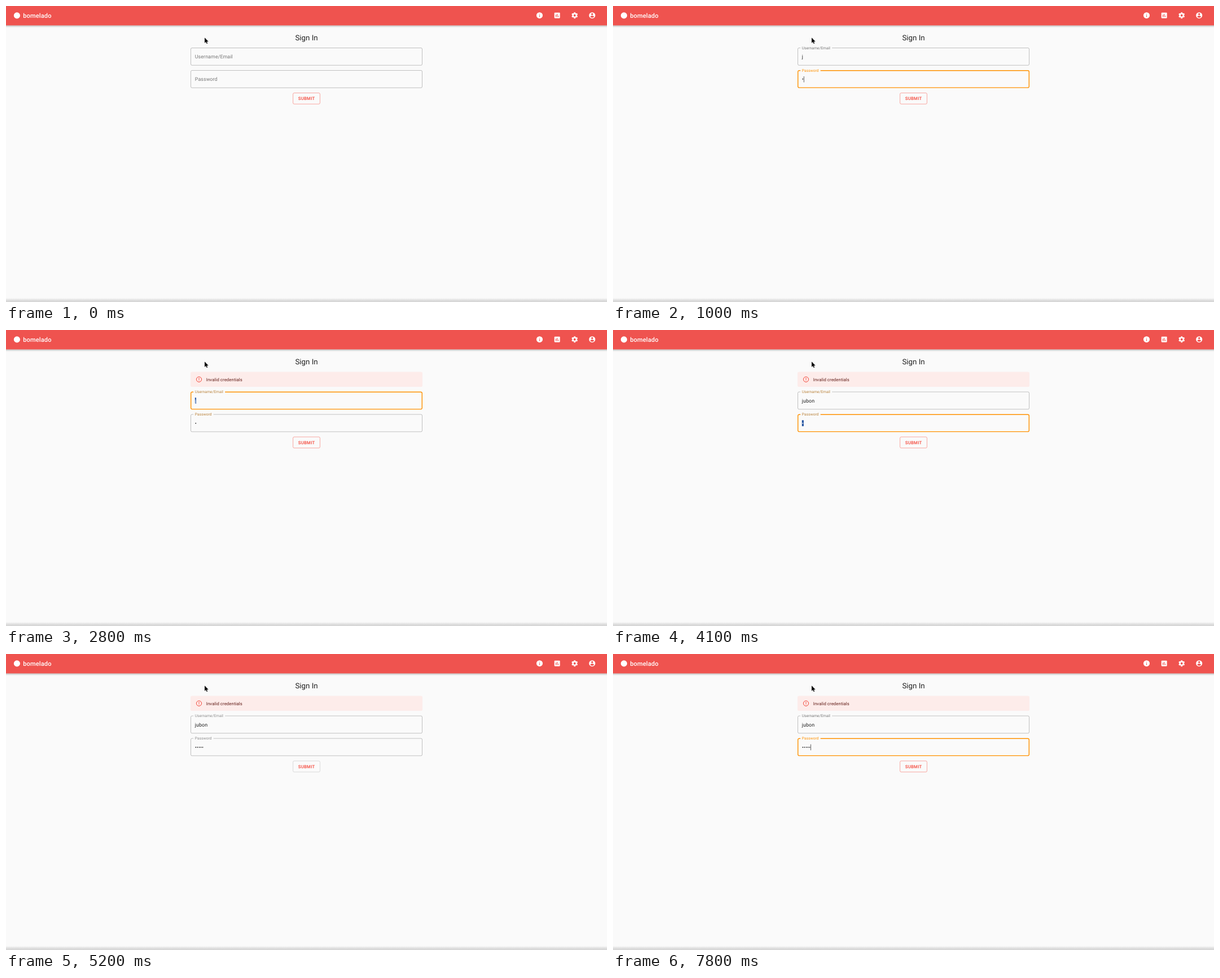
Write an HTML page that moves like this. It is 1065 px wide and 526 px high and loops after 8000 ms.

```html
<!DOCTYPE html>
<html lang="en">
<head>
<meta charset="utf-8">
<title>Sign In</title>
<style>
html, body { margin: 0; width: 100%; height: 100%; overflow: hidden; background: #fafafa; }
svg { display: block; width: 1065px; height: 526px; font-family: Roboto, Arial, sans-serif; }
text { white-space: pre; text-rendering: geometricPrecision; }
</style>
</head>
<body>
<svg id="stage" viewBox="0 0 1065 526" xmlns="http://www.w3.org/2000/svg">
  <defs>
    <linearGradient id="foot" x1="0" y1="0" x2="0" y2="1">
      <stop offset="0" stop-color="#fafafa"/>
      <stop offset=".55" stop-color="#dedede"/>
      <stop offset="1" stop-color="#d4d4d4"/>
    </linearGradient>
    <filter id="shade" x="-5%" y="-50%" width="110%" height="200%">
      <feDropShadow dx="0" dy="1.1" stdDeviation=".9" flood-opacity=".2"/>
      <feDropShadow dx="0" dy="1.6" stdDeviation="1.6" flood-opacity=".15"/>
    </filter>
    <clipPath id="btnClip"><rect x="509" y="154.5" width="47" height="19.7" rx="2.2"/></clipPath>
  </defs>
  <rect width="1065" height="526" fill="#fafafa"/>
  <rect y="519" width="1065" height="7" fill="url(#foot)"/>
  <rect x="-10" y="-10" width="1085" height="44.4" fill="#ef5350" filter="url(#shade)"/>
  <circle cx="19.4" cy="16.9" r="5.6" fill="#fff"/>
  <text x="30.3" y="20.5" font-size="11.1" font-weight="500" letter-spacing=".08" fill="#fff">bomelado</text>
  <g id="icons" fill="#fff"></g>
  <text x="532.5" y="61.2" font-size="13.3" text-anchor="middle" fill="#212121">Sign In</text>
  <g id="form"></g>
  <path d="M352 56.2v9.6l2.2-2 1.5 3.3 1.5-.7-1.5-3.2h3z" fill="#000" stroke="#fff" stroke-width=".8" paint-order="stroke"/>
</svg>
<script>
const LOOP = 8000, STEP = 100;
const NAME = 'jubon';
const LEFT = 327.4, RIGHT = 737.6, TEXT_X = 334.8, SIZE = 8.875, SPACING = 0.083;
const ORANGE = '#ff9100', RED = '#f44336', BAR = '#ef5350';
const TONES = { gray: '#777', dim: '#9f9f9f', soft: '#8c8c8c', mix: '#b9823a', orange: ORANGE };

const form = document.getElementById('form');
const pen = document.createElement('canvas').getContext('2d');
pen.font = SIZE * 10 + 'px Roboto, Arial, sans-serif';
const widthOf = s => pen.measureText(s).width / 10 + s.length * SPACING;

// Each entry changes only the listed parts of the state.
const script = [
  [0, { user: 0, pass: 0, userUp: 0, passUp: 0, userTone: 'gray', passTone: 'gray',
        focus: '', selected: false, alert: false, off: false, edge: 'rgba(244,67,54,.5)', ripple: null }],
  [400, { focus: 'user', userUp: 0.25, userTone: 'mix' }],
  [500, { userUp: 0.85, userTone: 'orange' }],
  [600, { userUp: 1 }],
  [700, { user: 1 }],
  [800, { focus: 'pass', passUp: 0.25, userTone: 'mix', passTone: 'mix' }],
  [900, { passUp: 0.85, passTone: 'orange' }],
  [1000, { passUp: 1, pass: 1, userTone: 'gray' }],
  [1200, { focus: '', off: true, userTone: 'soft', passTone: 'mix', edge: 'rgba(0,0,0,.2)' }],
  [1300, { userTone: 'dim', passTone: 'dim', edge: 'rgba(0,0,0,.12)' }],
  [1400, { alert: true, off: false, userTone: 'soft', passTone: 'soft', edge: 'rgba(0,0,0,.14)' }],
  [1500, { edge: 'rgba(180,50,40,.3)' }],
  [1600, { userTone: 'gray', passTone: 'gray', edge: 'rgba(244,67,54,.5)' }],
  [2000, { ripple: 1950 }],
  [2800, { ripple: null, focus: 'user', selected: true, userTone: 'mix', passTone: 'mix' }],
  [3000, { userTone: 'orange', passTone: 'gray' }],
  [3500, { selected: false, user: 1 }],
  [3600, { user: 2 }],
  [3700, { user: 4 }],
  [4000, { user: 5 }],
  [4100, { focus: 'pass', selected: true, userTone: 'mix', passTone: 'mix' }],
  [4300, { userTone: 'gray', passTone: 'orange' }],
  [4500, { selected: false, pass: 2 }],
  [4600, { pass: 3 }],
  [4800, { pass: 5 }],
  [5000, { focus: '', off: true, userTone: 'dim', passTone: 'dim', edge: 'rgba(0,0,0,.12)' }],
  [5200, { off: false, userTone: 'soft', passTone: 'soft', edge: 'rgba(0,0,0,.14)' }],
  [5400, { userTone: 'gray', passTone: 'gray', edge: 'rgba(244,67,54,.5)' }],
  [5900, { ripple: 5700 }],
  [6800, { ripple: null, focus: 'pass', selected: true, passTone: 'mix' }],
  [7200, { passTone: 'orange' }],
  [7500, { selected: false, pass: 2 }],
  [7700, { pass: 4 }],
  [7800, { pass: 5 }]
];

function stateAt(t) {
  return Object.assign({}, ...script.filter(([at]) => at <= t).map(([, change]) => change));
}

function label(text, x, y, size, color, extra = '') {
  return `<text x="${x}" y="${y}" font-size="${size}" fill="${color}" ${extra}>${text}</text>`;
}

function outline(top, gapEnd, focused) {
  const inset = focused ? 0.3 : 0.1, r = 2.2;
  const l = LEFT + inset, rt = RIGHT - inset, y = top + inset, b = top + 31 - inset;
  const corner = (dx, dy) => `a${r} ${r} 0 0 1 ${dx} ${dy}`;
  const d = `M${gapEnd} ${y}H${rt - r}${corner(r, r)}V${b - r}${corner(-r, r)}` +
    `H${l + r}${corner(-r, -r)}V${y + r}${corner(r, -r)}H332.2`;
  const paint = focused ? `stroke="${ORANGE}" stroke-width="1.4"` : 'stroke="#000" stroke-opacity=".26" stroke-width=".9"';
  return `<path d="${d}" fill="none" ${paint}/>`;
}

function field(s, key, top, title, value) {
  const up = s[key + 'Up'], focused = s.focus === key;
  const gapEnd = up > 0 ? 337.8 + widthOf(title) * 0.75 : 332.2;
  const scale = 1 - 0.25 * up, base = top + 18.7 - 16.3 * up;
  const end = TEXT_X + widthOf(value), marked = focused && s.selected;
  let out = outline(top, gapEnd, focused);
  out += label(title, TEXT_X, base, SIZE * scale, TONES[s[key + 'Tone']], `letter-spacing="${SPACING * scale}"`);
  if (marked) out += `<rect x="${TEXT_X}" y="${top + 10.4}" width="${end - TEXT_X}" height="10.6" fill="#20509e"/>`;
  const ink = marked ? '#fff' : s.off ? '#9f9f9f' : '#212121';
  out += label(value, TEXT_X, top + 18.7, SIZE, ink, `letter-spacing="${SPACING}"`);
  if (focused && !marked) out += `<rect x="${end}" y="${top + 10.6}" width=".7" height="10.6" fill="#222"/>`;
  return out;
}

function ripple(t, start) {
  const age = t - start;
  const grow = Math.min(1, age / 200);
  const pulse = age < 200 ? 0 : (1 - Math.cos(2 * Math.PI * (age - 200) / 2500)) / 2;
  const r = 20.2 * grow * (1 - 0.08 * pulse);
  return `<g clip-path="url(#btnClip)"><circle cx="532.5" cy="164.3" r="${r}" fill="${RED}" opacity="${0.1 + 0.2 * grow}"/></g>`;
}

function button(s, t) {
  return (s.ripple === null ? '' : ripple(t, s.ripple)) +
    `<rect x="508.6" y="154.5" width="47.8" height="19.7" rx="2.2" fill="none" stroke="${s.edge}" stroke-width=".9"/>` +
    label('SUBMIT', 532.6, 167.1, 7.77, s.off ? '#b9b9b9' : RED, 'font-weight="500" letter-spacing=".22" text-anchor="middle"');
}

function alertBox() {
  return '<rect x="327" y="74.5" width="411" height="26.6" rx="2.2" fill="#fdecea"/>' +
    `<circle cx="342" cy="87.8" r="4.6" fill="none" stroke="${RED}" stroke-width="1"/>` +
    `<path d="M342 85.2v3.1M342 89.3v1" stroke="${RED}" stroke-width="1"/>` +
    label('Invalid credentials', 354.8, 90.6, 7.77, '#611a15', 'letter-spacing=".083"');
}

function draw(t) {
  const s = stateAt(t);
  const body = field(s, 'user', 74.4, 'Username/Email', NAME.slice(0, s.user)) +
    field(s, 'pass', 114.4, 'Password', '•'.repeat(s.pass)) + button(s, t);
  form.innerHTML = (s.alert ? alertBox() : '') + `<g transform="translate(0 ${s.alert ? 35.5 : 0})">${body}</g>`;
}

function drawIcons() {
  const disc = '<circle r="10"/>';
  const teeth = [0, 60, 120].map(a => `<path d="M-2.3-10H2.3L3-6V6L2.3 10H-2.3L-3 6V-6z" transform="rotate(${a})"/>`).join('');
  const shapes = [
    [945.5, disc + `<path d="M-1-5h2v2h-2zM-1-1h2v6h-2z" fill="${BAR}"/>`],
    [976.7, `<rect x="-9" y="-9" width="18" height="18" rx="2"/><path d="M-5-2h2v7h-2zM-1-5h2v10h-2zM3 1h2v4h-2z" fill="${BAR}"/>`],
    [1007.7, `<circle r="7.4"/>${teeth}<circle r="3.5" fill="${BAR}"/>`],
    [1038.7, disc + `<g fill="${BAR}"><circle cy="-4" r="3"/><path d="M0 7.2C-2.5 7.2-4.7 5.9-6 4C-6 2-2 .9 0 .9S6 2 6 4C4.7 5.9 2.5 7.2 0 7.2z"/></g>`]
  ];
  document.getElementById('icons').innerHTML = shapes.map(([x, shape]) =>
    `<g transform="translate(${x} 16.7) scale(.555)">${shape}</g>`).join('');
}

let start = null, shown = -1;
function tick(now) {
  if (start === null) start = now;
  const t = Math.floor((now - start) % LOOP / STEP) * STEP;
  if (t !== shown) draw(shown = t);
  requestAnimationFrame(tick);
}

drawIcons();
draw(0);
requestAnimationFrame(tick);
</script>
</body>
</html>
```
